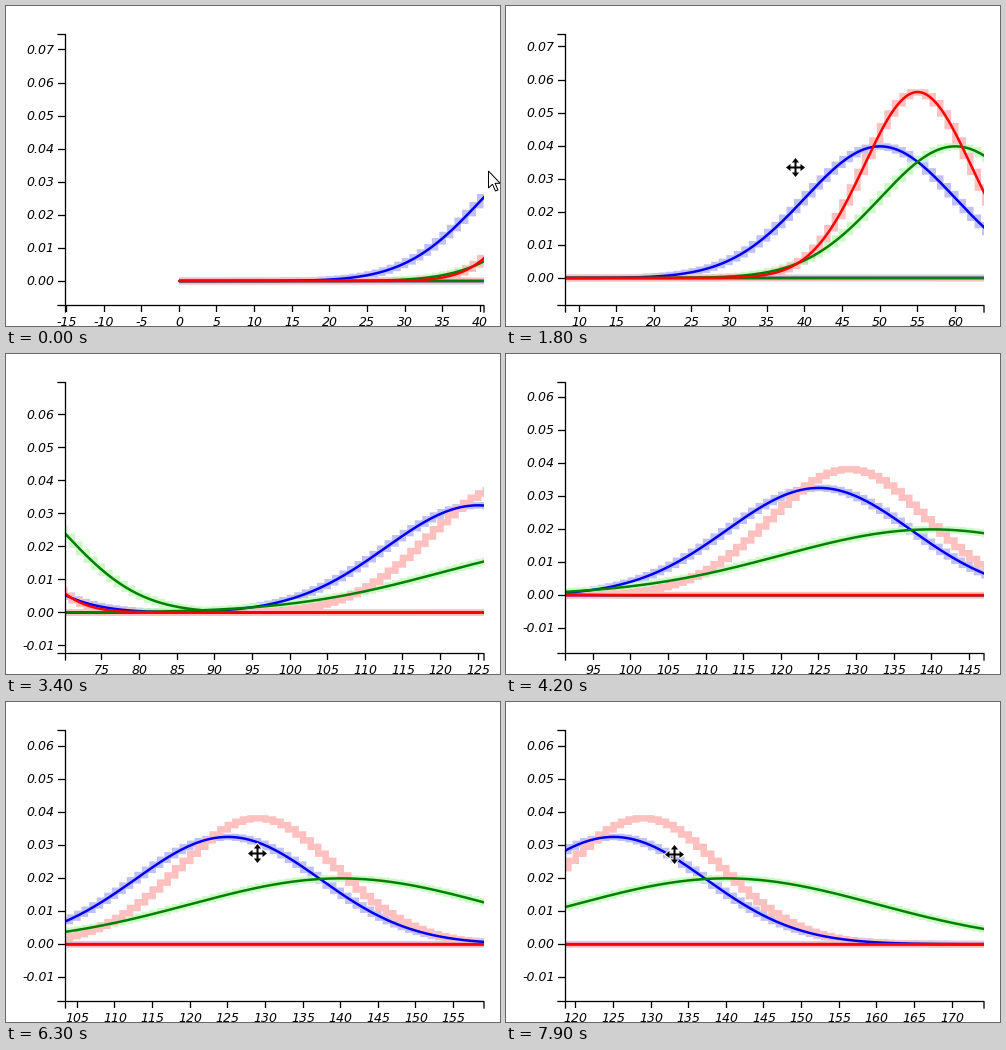
Recreate the animation shown at these times as a matplotlib script. Size 494 by 320 pixels, loop 8 s.

```python
import math

import numpy as np
import matplotlib.pyplot as plt
from matplotlib.animation import FuncAnimation
from matplotlib.collections import LineCollection
from matplotlib.patches import Polygon, Rectangle

W, H, DPI = 494, 320, 100
FRAMES, STEP_MS = 80, 100
LEFT, RIGHT, TOP, BOTTOM = 60, 478, 28, 299
SX, SY = 7.525, 3300  # pixels per unit
PX = 72 / DPI         # one pixel in points

BLUE, GREEN, RED = "#0000f0", "#008000", "#ff0000"
PALE = {BLUE: "#c0c0fa", GREEN: "#ccfac6", RED: "#ffc0c0"}

# Normal curves: mean, sigma, colour, whether a fitted line is drawn
CURVES = [
    (50, 10, BLUE, True),
    (125, 12.27, BLUE, True),
    (60, 10, GREEN, True),
    (140, 20, GREEN, True),
    (55, 7.08, RED, True),
    (129, 10.45, RED, False),
]

# Panning: ms, left edge of the view, pixel row of zero
VIEW = np.array([
    (500, -15.05, 275),
    (1800, 8.27, 272),
    (2700, 54.34, 261),
    (3400, 70.23, 258.6),
    (4200, 91.38, 241.2),
    (4700, 91.38, 241.2),
    (5400, 101.9, 242.2),
    (6300, 103.49, 242.2),
    (7900, 118.69, 242.2),
])

# Drags: start, then a moment with the pointer's place at it
DRAGS = [(0, 1800, 289, 161), (4700, 6300, 251, 151), (7200, 7900, 168, 152)]


def view(t):
    return np.interp(t, VIEW[:, 0], VIEW[:, 1]), np.interp(t, VIEW[:, 0], VIEW[:, 2])


def pointer(t):
    """The pointer holds on to the plot while it is dragged."""
    _, pin, x, y = [d for d in DRAGS if d[0] <= t][-1]
    (left, zero), (pin_left, pin_zero) = view(t), view(pin)
    approach = max(0, 1 - t / 500)
    return x - (left - pin_left) * SX + 18 * approach, y + zero - pin_zero + approach


def pdf(u, mean, sigma):
    return np.exp(-((u - mean) / sigma) ** 2 / 2) / (sigma * math.sqrt(2 * math.pi))


def crisp(v):
    return math.floor(v) + .5


fig = plt.figure(figsize=(W / DPI, H / DPI), dpi=DPI, facecolor="white")
ax = fig.add_axes([0, 0, 1, 1])
ax.set_xlim(0, W)
ax.set_ylim(H, 0)
ax.axis("off")

pane = Rectangle((LEFT, TOP), RIGHT - LEFT, BOTTOM - TOP, fill=False, lw=0)
ax.add_patch(pane)


def add_line(color, width, z, cap):
    line, = ax.plot([], [], color=color, lw=width * PX, zorder=z, snap=False,
                    solid_joinstyle="miter", solid_capstyle=cap)
    line.set_clip_path(pane)
    return line


fine = np.linspace(0, 200, 1001)
bins = np.arange(200)
edges = np.column_stack([bins, bins + 1]).ravel()
series = []
for mean, sigma, color, fitted in CURVES:
    steps = np.repeat(pdf(bins + .5, mean, sigma), 2)
    series.append((add_line(PALE[color], 6.5, 1, "butt"), edges, steps))
    if fitted:
        series.append((add_line(color, 2.5, 2, "round"), fine, pdf(fine, mean, sigma)))

# Axis lines with their end ticks
x0, y0, y1 = LEFT - .5, TOP + .5, BOTTOM + .5
for xs, ys in [((52, x0, x0, 52), (y0, y0, y1, y1)),
               ((x0, x0, RIGHT, RIGHT), (306, y1, y1, 306))]:
    ax.plot(xs, ys, color="black", lw=1.3 * PX, zorder=3, snap=False)

ticks = LineCollection([], colors="black", linewidths=1.3 * PX, zorder=3, snap=False)
ax.add_collection(ticks, autolim=False)


def label(text, align):
    return ax.text(0, 0, text, family="DejaVu Sans", style="italic", size=12.5 * PX,
                   ha=align, va="baseline", zorder=4)


x_labels = {n: label(str(n), "center") for n in range(-15, 181, 5)}
y_labels = {n / 100: label(f"{n / 100:.2f}", "right") for n in range(-1, 8)}

ARROW = np.array([(0, 0), (0, 17), (4, 13.2), (7, 20), (9.5, 19), (6.6, 12.3), (11.7, 12.3)])
ARM = np.array([(-1, -1), (-1, -5), (-3.6, -5), (0, -9.5), (3.6, -5), (1, -5)])
TURN = np.array([(0, 1), (-1, 0)])
MOVE = np.vstack([ARM @ np.linalg.matrix_power(TURN, k) for k in range(4)])

arrow = Polygon(ARROW, fc="white", ec="black", lw=PX, zorder=6)
halo = Polygon(MOVE, fc="white", ec="white", lw=2 * PX, zorder=5)
move = Polygon(MOVE, fc="black", lw=0, zorder=6)
for shape in (arrow, halo, move):
    ax.add_patch(shape)


def draw(i):
    t = i * STEP_MS
    left, zero = view(t)
    cx, cy = pointer(t)

    for line, u, v in series:
        line.set_data(LEFT + (u - left) * SX, zero - v * SY)

    marks = []
    for value, text in x_labels.items():
        x = LEFT + (value - left) * SX
        inside = LEFT <= x <= RIGHT
        text.set_visible(inside)
        text.set_position((x, 320))
        if inside:
            marks.append([(crisp(x), 300), (crisp(x), 306)])
    for value, text in y_labels.items():
        y = zero - value * SY
        inside = TOP <= y <= BOTTOM
        text.set_visible(inside)
        text.set_position((48.5, y + 4))
        if inside:
            marks.append([(52, crisp(y)), (59, crisp(y))])
    ticks.set_segments(marks)

    outside = cx > RIGHT
    arrow.set_visible(outside)
    arrow.set_xy(ARROW + (cx, cy))
    for shape in (halo, move):
        shape.set_visible(not outside)
        shape.set_xy(MOVE + (cx + .5, cy + .5))
    return []


anim = FuncAnimation(fig, draw, frames=FRAMES, init_func=lambda: draw(0),
                     interval=STEP_MS, repeat=True, repeat_delay=0, blit=False)
plt.show()
```
